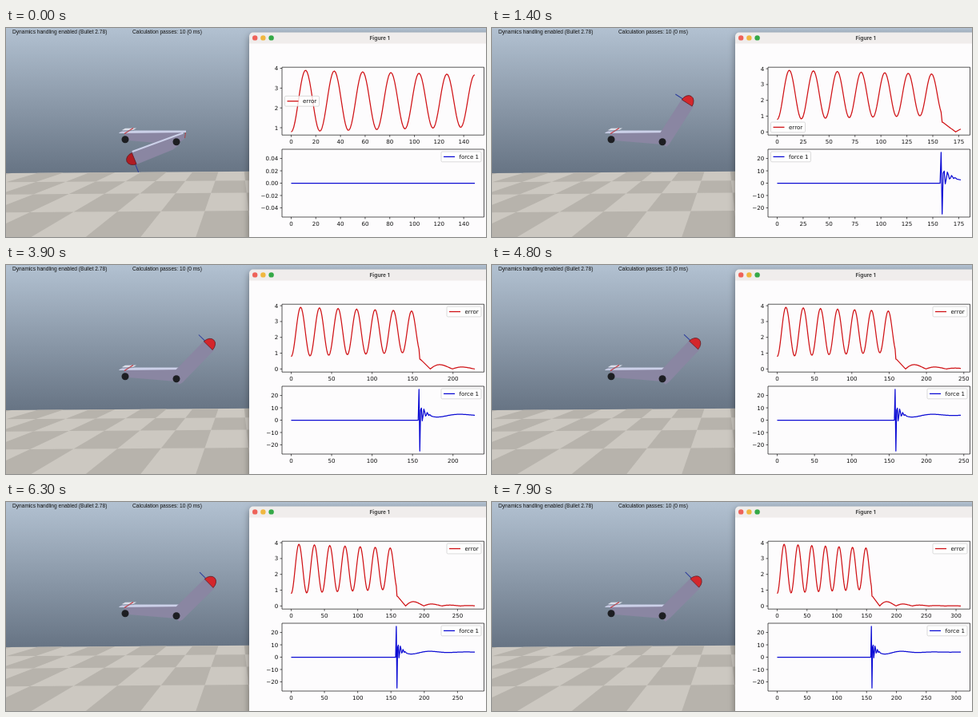
These frames come from a looping animation (600 px wide and 262 px high, 8000 ms). An HTML page with a canvas:

```html
<!DOCTYPE html>
<html lang="en">
<head>
<meta charset="utf-8">
<title>Arm controller</title>
<style>
html, body { margin: 0; width: 600px; height: 262px; overflow: hidden; }
canvas { display: block; }
</style>
</head>
<body>
<canvas id="stage" width="600" height="262"></canvas>
<script>
const ctx = document.getElementById('stage').getContext('2d');
const { PI, sin, cos, exp, abs, min, max, floor, ceil } = Math;
const RED = '#d01216', BLUE = '#0c0cd4', BODY = '#8a86a2', PALE = '#ccd1e9';
const LEFT = 345, WIDTH = 252.5, HEIGHT = 85;
const SWITCH_ON = 158, FIRST_ZERO = 172;
const RING = [0, 25, -25, 8.2, 9.8, -0.5, 3.5, 9, 6.8, 3.4, 4, 6.2, 5.2, 3.8, 4.4, 4.2, 3.4];

// Signed angle error in radians: free swing, catch, then damped settling.
function angleError(n) {
  if (n <= SWITCH_ON) {
    const turns = n / 23.4 + 6.37e-6 * n * n;
    return 2.355 - (1.57 - 0.0017 * n) * cos(2 * PI * turns);
  }
  const d = n - FIRST_ZERO;
  if (d < 0) return min(0.62, -0.05 * d);
  return -0.39 * exp(-0.029 * d) * sin(PI * d / 27.4);
}

function force(n) {
  const i = n - SWITCH_ON + 1;
  if (i < 0) return 0;
  if (i < RING.length) return RING[i];
  return 4.1 - 1.5 * exp(-0.03 * (n - 183)) * cos(2 * PI * (n - 183) / 55);
}

function poly(color, ...p) {
  ctx.beginPath();
  for (let i = 0; i < p.length; i += 2) ctx.lineTo(p[i], p[i + 1]);
  ctx.closePath();
  ctx.fillStyle = color;
  ctx.fill();
}

function line(color, width, ...p) {
  ctx.beginPath();
  for (let i = 0; i < p.length; i += 2) ctx.lineTo(p[i], p[i + 1]);
  ctx.strokeStyle = color;
  ctx.lineWidth = width;
  ctx.stroke();
}

function dot(color, x, y, r) {
  ctx.beginPath();
  ctx.arc(x, y, r, 0, 2 * PI);
  ctx.fillStyle = color;
  ctx.fill();
}

function text(str, x, y, font, align = 'left', color = '#111') {
  ctx.font = font;
  ctx.textAlign = align;
  ctx.fillStyle = color;
  ctx.fillText(str, x, y);
}

const label = (str, x, y, align) => text(str, x, y, '7.1px "DejaVu Sans", sans-serif', align);

function drawFloor() {
  const rowY = j => 110 + 1 / (0.01408 - 0.00192 * j);
  const colX = (u, y) => 290 + (u + 0.74) * (y - 110) / 2.2;
  ctx.save();
  ctx.translate(0, 1);
  ctx.transform(1, -0.007, 0, 1, 0, 0);
  poly('#ccc8c1', -5, 181, 310, 181, 310, 275, -5, 275);
  for (let j = 0; j < 5; j++) {
    const a = rowY(j), b = rowY(j + 1);
    for (let k = -12; k < 4; k++) {
      if ((k + j) % 2) continue;
      poly('#b7b3ac', colX(k - 0.5, a), a, colX(k + 0.5, a), a,
        colX(k + 0.5, b), b, colX(k - 0.5, b), b);
    }
  }
  ctx.restore();
}

function drawArm(angle) {
  const hanging = cos(angle) < 0;
  ctx.save();
  ctx.translate(213, 142);
  ctx.rotate(-angle);
  poly(BODY, -3, 8, 2, 9.2, 58, 9.2, 59, -8, 8, -8, -3, -5);
  if (hanging) line(PALE, 2, -12, 6.5, 56, 8.8);
  line('#2c3c9c', 1, 58.5, -6, 58.5, -18);
  ctx.beginPath();
  ctx.ellipse(57, 0, 10, 7.6, 0, -PI / 2, PI / 2);
  ctx.closePath();
  ctx.fillStyle = hanging ? '#b01c22' : '#d4262b';
  ctx.fill();
  ctx.strokeStyle = '#5a1a22';
  ctx.lineWidth = 0.7;
  ctx.stroke();
  ctx.restore();
}

function drawScene(angle) {
  const sky = ctx.createLinearGradient(0, 0, 0, 182);
  sky.addColorStop(0, '#b2c1d1');
  sky.addColorStop(1, '#677484');
  ctx.fillStyle = sky;
  ctx.fillRect(0, 0, 600, 262);
  drawFloor();

  const small = '6.6px "Liberation Sans", Arial, sans-serif';
  text('Dynamics handling enabled (Bullet 2.78)', 8, 6.8, small);
  text('Calculation passes: 10 (0 ms)', 158, 6.8, small);

  poly(BODY, 146, 131, 222, 131, 223, 139, 213, 146, 153, 141);
  poly(PALE, 141, 131.5, 146, 128.5, 225, 128.5, 225, 131, 142, 132);
  poly('#dcdfea', 145, 128, 149, 125.7, 163, 125.5, 159, 128);
  line('#c23a40', 1.2, 148, 132.5, 159, 125.5);
  line('#7f8199', 0.6, 143, 130, 160, 128.3);
  line('#b04048', 1, 224.5, 131, 223.5, 138);
  drawArm(angle);
  dot('#1d1e22', 149, 139.8, 4.5);
  dot('#1d1e22', 213, 142.7, 4.5);
}

function drawWindow() {
  ctx.save();
  ctx.shadowColor = 'rgba(0,0,0,.4)';
  ctx.shadowBlur = 8;
  ctx.shadowOffsetY = 3;
  ctx.beginPath();
  ctx.roundRect(304, 5.5, 325, 290, 5);
  ctx.fillStyle = '#f0edec';
  ctx.fill();
  ctx.restore();
  ctx.fillStyle = '#fdfcfd';
  ctx.fillRect(304, 19.5, 296, 243);
  ['#ee6259', '#f0b73f', '#35a947'].forEach((c, i) => dot(c, 311.2 + 10.2 * i, 12.4, 3.2));
  text('Figure 1', 467, 14.7, 'bold 6.7px Inter, sans-serif', 'center', '#444');
}

function legend(name, color, x, y, w) {
  ctx.beginPath();
  ctx.roundRect(x, y, w, 12.8, 1.5);
  ctx.fillStyle = 'rgba(255,255,255,.8)';
  ctx.fill();
  ctx.strokeStyle = '#ccc';
  ctx.lineWidth = 0.7;
  ctx.stroke();
  line(color, 1.3, x + 3, y + 6.4, x + 17, y + 6.4);
  label(name, x + 22.5, y + 8.9);
}

function plot(top, data, color, yStep, digits) {
  const last = data.length - 1;
  let lo = min(...data), hi = max(...data);
  if (lo === hi) { lo -= 0.05; hi += 0.05; }
  const padX = WIDTH / 22, padY = HEIGHT / 22;
  const px = n => LEFT + padX + n / last * (WIDTH - 2 * padX);
  const py = v => top + HEIGHT - padY - (v - lo) / (hi - lo) * (HEIGHT - 2 * padY);

  const xStep = [20, 25, 50].find(s => s * 9 >= 1.1 * last);
  for (let n = 0; n <= last * 1.05; n += xStep) {
    line('#111', 0.7, px(n), top + HEIGHT, px(n), top + HEIGHT + 2.5);
    label(n, px(n), top + HEIGHT + 11, 'center');
  }
  const margin = (hi - lo) / 20;
  for (let k = ceil((lo - margin) / yStep); k * yStep <= hi + margin; k++) {
    const y = py(k * yStep);
    line('#111', 0.7, LEFT - 2.5, y, LEFT, y);
    label((k * yStep).toFixed(digits).replace('-', '\u2212'), LEFT - 4.8, y + 2.6, 'right');
  }

  ctx.lineJoin = 'round';
  line(color, 1.25, ...data.flatMap((v, n) => [px(n), py(v)]));
  ctx.strokeStyle = '#111';
  ctx.lineWidth = 0.7;
  ctx.strokeRect(LEFT, top, WIDTH, HEIGHT);
}

function draw(now) {
  const step = floor(now % 8000 / 100);
  const last = floor(149 + 2.025 * step);
  const samples = Array.from({ length: last + 1 }, (_, n) => n);
  const active = last >= SWITCH_ON;

  // The arm runs slightly ahead of the plotted samples.
  drawScene(PI / 4 - angleError(last + 1.4));
  drawWindow();

  plot(49.2, samples.map(n => abs(angleError(n))), RED, 1, 0);
  if (last > 183) legend('error', RED, 551, 52.1, 43);
  else legend('error', RED, 348.5, last >= 168 ? 118 : 85.3, 43);

  plot(152, samples.map(force), BLUE, active ? 10 : 0.02, active ? 0 : 2);
  legend('force 1', BLUE, active && last <= 194 ? 348.5 : 544, 155, 50);
  requestAnimationFrame(draw);
}
requestAnimationFrame(draw);
</script>
</body>
</html>
```
